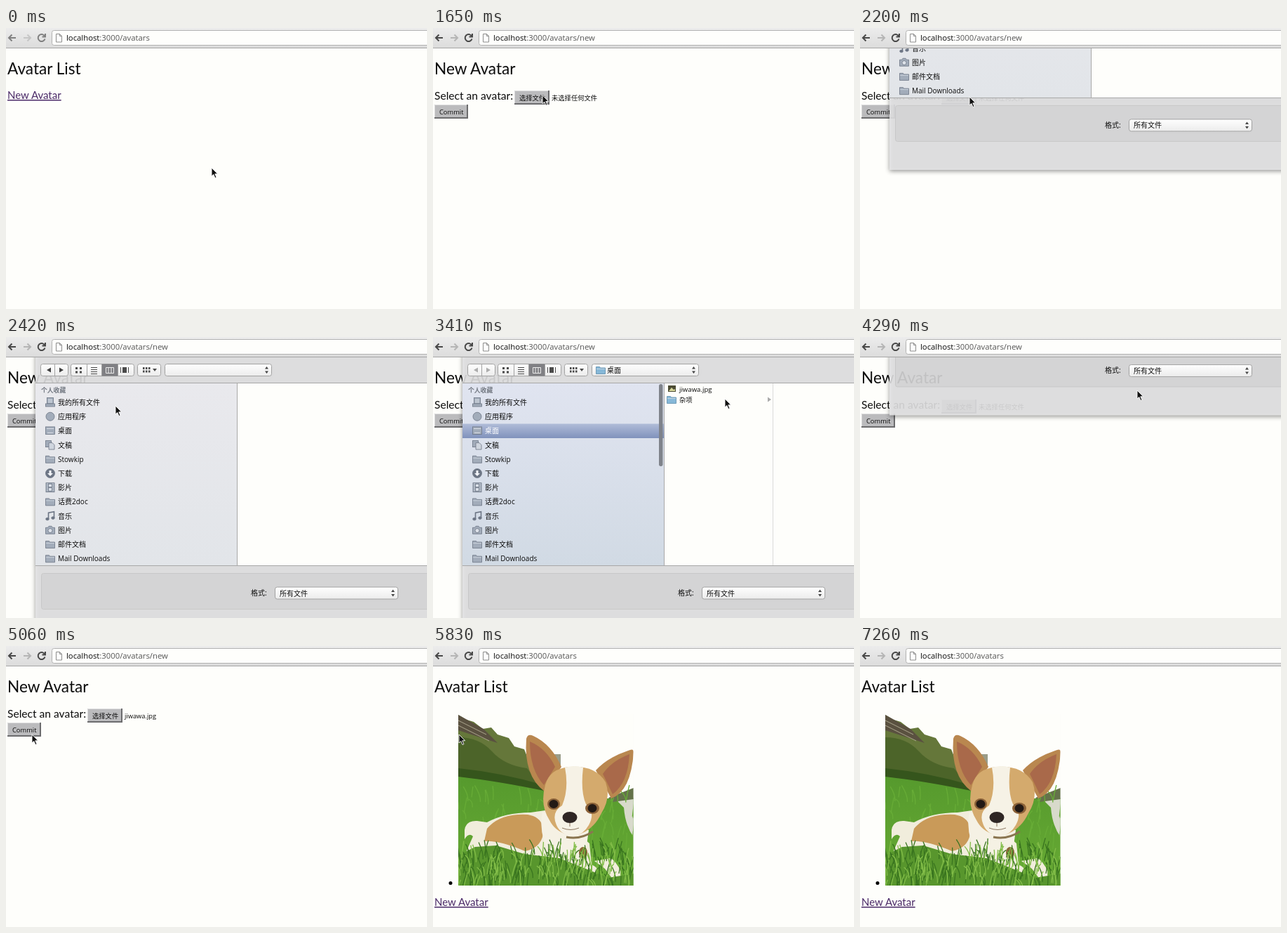
An HTML page that plays this animation: 600 px wide and 400 px high, repeating every 7370 ms.

```html
<!DOCTYPE html>
<html lang="zh">
<head>
<meta charset="utf-8">
<title>Avatar upload</title>
<style>
html, body { margin: 0; width: 100%; height: 100%; overflow: hidden; background: #fefefb; }
svg { display: block; width: 600px; height: 400px; }
text { font: 500 10px "Open Sans", "Noto Sans CJK SC", "Noto Sans CJK", sans-serif; fill: #0c0c0c; }
.page text { font: 15.6px Lato, sans-serif; }
.page .title { font-size: 22.6px; }
.page .link { font-size: 15px; fill: #4b2a68; text-decoration: underline; }
.page .ui { font: 500 9.3px "Open Sans", "Noto Sans CJK SC", "Noto Sans CJK", sans-serif; }
.url { font-size: 11.3px; }
.sheet { filter: drop-shadow(0 2px 3px #0007); }
.icon { fill: #a2acba; stroke: #6c7584; stroke-width: .8; }
.blue .icon { fill: #86b8d8; stroke: #5c8cab; }
.btn { fill: url(#button); stroke: #a2a2a2; }
</style>
</head>
<body>
<svg id="stage" viewBox="0 0 600 400"></svg>
<script>
const LOOP = 7370, STEP = 110;
const NEW_PAGE = 1100, FILLED = 2530, PICKED = 3740, CHOSEN = 4400, DONE = 5280;

const text = (x, y, s, attrs = '') => `<text x="${x}" y="${y}" ${attrs}>${s}</text>`;
const rect = (x, y, w, h, attrs = '') => `<rect x="${x}" y="${y}" width="${w}" height="${h}" ${attrs}/>`;
const path = (d, attrs = '') => `<path d="${d}" ${attrs}/>`;
const oval = (x, y, rx, ry, fill) => `<ellipse cx="${x}" cy="${y}" rx="${rx}" ry="${ry}" fill="${fill}"/>`;
const fade = (id, top, bottom) => `<linearGradient id="${id}" x2="0" y2="1">
  <stop stop-color="${top}"/><stop offset="1" stop-color="${bottom}"/></linearGradient>`;

// Icons in a 14 by 14 box
const glyphs = {
  folder: path('M.5 2.5h5l1 1.5h7v8.5h-13z') + path('M1 5.5h12', 'stroke="#d5dce4"'),
  drive: rect(2.5, .5, 9, 8.5) + rect(.5, 9, 13, 4) + path('M4 3h6M4 5h6M4 7h6', 'stroke="#e8ecf2"'),
  apps: '<circle cx="7" cy="7" r="6"/>',
  desk: rect(.5, 1.5, 13, 10.5) + path('M2 4h10M3 10h8', 'stroke="#eceff4"'),
  docs: rect(.5, 1, 8, 9) + path('M5 4h5l3 3v6.5h-8z', 'fill="#cfd5de"'),
  down: '<circle cx="7" cy="7" r="6.5" fill="#6c7584"/>' +
    path('M5.5 3h3v4h2.5l-4 4-4-4h2.5z', 'fill="#f4f6fa" stroke="none"'),
  film: rect(1, .5, 12, 13) + path('M3 1v12M11 1v12', 'stroke="#eceff4" stroke-dasharray="1.5"') +
    rect(4.5, 2, 5, 4.5, 'fill="#dde2ea"') + rect(4.5, 7.5, 5, 4.5, 'fill="#dde2ea"'),
  music: path('M4.5 11V2.5l8-1.5v8.5', 'fill="none" stroke-width="1.6"') +
    oval(3, 11.5, 2.3, 1.8, '#6c7584') + oval(11, 10, 2.3, 1.8, '#6c7584'),
  photo: path('M.5 3.5h3l1.5-2h4l1.5 2h3v9h-13z') + '<circle cx="7" cy="7.8" r="3" fill="#dde2ea"/>'
};
const icon = (name, x, y) => `<g class="icon" transform="translate(${x} ${y})">${glyphs[name]}</g>`;
const pill = (x, y, w, h = 17) => rect(x + .5, y + .5, w, h, 'rx="3" class="btn"');
const steppers = (x, y) => path(`M${x} ${y - 1.5}l2.5-3.5 2.5 3.5zm0 3l2.5 3.5 2.5-3.5z`, 'fill="#444"');

function bevel(x, y, w, label) {
  return rect(x, y, w, 20, 'fill="#bbbbbd"') +
    path(`M${x + .5} ${y + 19}V${y + .5}h${w - 1}`, 'stroke="#dededf" fill="none"') +
    path(`M${x} ${y + 19}h${w - 1}V${y}`, 'stroke="#6c6c6e" stroke-width="2" fill="none"') +
    text(x + 7, y + 13.5, label, 'class="ui"');
}

function chrome() {
  return rect(0, 0, 600, 28, 'fill="url(#bar)"') + rect(0, 28, 600, 1, 'fill="#a6a6a6"') +
    `<g id="nav" fill="none" stroke-width="2">
      ${path('M14 14H4M8.500 9.500L4 14l4.500 4.500')}
      ${path('M25 14h10M30.500 9.500L35 14l-4.500 4.500', 'opacity=".3"')}
      ${path('M55 11.500a5 5 0 1 0 .500 4M56 8v4.500h-4.500')}</g>` +
    rect(65.5, 3.5, 560, 21, 'rx="3" fill="#fefefc" stroke="#b2b2b2"') +
    path('M71.500 8.500h5l3 3v8.500h-8zM76.500 8.500v3h3', 'fill="#fff" stroke="#8c8c8c"') +
    `<text x="86" y="18" class="url">localhost<tspan fill="#555">:3000/avatars<tspan id="tail"></tspan></tspan></text>`;
}

function seeded(seed) {
  return () => (seed = seed * 16807 % 2147483647) / 2147483647;
}

function blades(count, color, top, seed) {
  const rnd = seeded(seed);
  let d = '';
  for (let i = 0; i < count; i++) {
    const x = 36 + rnd() * 250, y = top + rnd() * (350 - top), lean = rnd() * 16 - 8;
    d += `M${x.toFixed(1)} ${y.toFixed(1)}q1-9 ${lean.toFixed(1)}-${(12 + rnd() * 14).toFixed(1)}`;
  }
  return path(d, `fill="none" stroke="${color}" stroke-width="1.3"`);
}

function photo() {
  const ear = 'fill="#b9874f"', inner = 'fill="#a9694a"', white = 'fill="#f1eddc"';
  return `<g clip-path="url(#frame)">` +
    rect(36, 97, 250, 245, 'fill="#fefefa"') +
    path('M36 98l12 7 10 3 13 10 12-2 9 10 16 5 8 12 14 4 8 20 10 18 20 20H36z', 'fill="#65773a"') +
    path('M36 98l36 20 20 20-56-18z', 'fill="#5a5140"') +
    path('M36 106l40 20M36 113l44 22', 'stroke="#aaa58c"') +
    path('M36 130q30 0 48 20t50 24l20 26H36z', 'fill="#4c6429"') +
    path('M168 154h14v18h-14z', 'fill="#9a9c88"') +
    path('M36 178q60 4 120 20l50 20 80-2v130H36z', 'fill="url(#grass)"') +
    path('M36 174q60 6 122 24v8Q90 192 36 186z', 'fill="#35551c"') +
    path('M256 214l30-12v70q-12-16-14-42z', 'fill="#d8dacb"') +
    path('M250 216l36-14v16l-30 4z', 'fill="#64724a"') +
    blades(130, '#67ac36', 215, 7) +
    path('M45 262q2-14 18-13l14 2q26-14 62-14l28-4 56 48 4 40q-40 14-90 4l-76-24q-20 8-12-12l8-18q-6-6-12 4z', white) +
    path('M77 260q18-22 58-20 24 4 22 28-4 20-26 24-38-16-58-14z', 'fill="#c99a59"') +
    path('M156 236q-6 30 10 60l50 10 6-44z', 'fill="#f5f1e4"') +
    path('M205 308q20-2 30 10l-6 10-26-10zM230 306l24-4q14 12 15 28l-12 3-12-16z', white) +
    path('M133 132q2-8 10-4 26 12 40 44l-24 35q-30-22-26-75z', ear) +
    path('M138 136q24 10 36 36l-16 26q-20-22-20-62z', inner) +
    path('M286 151q0-6-8-2-30 10-46 28l22 40q28-10 32-66z', ear) +
    path('M280 154q-26 10-38 28l14 29q22-16 24-57z', inner) +
    path('M160 198q6-24 36-26 36-2 50 22 8 22-6 44-12 26-38 32-26-2-36-22-14-22-6-50z', 'fill="#d4aa6d"') +
    path('M188 173q14-4 26 0-4 34 4 52 14 12 4 30-8 14-22 16-18-2-24-16-8-18 8-28 10-24 4-54z', 'fill="#f6f2e6"') +
    oval(172, 225, 9, 8, '#8a6138') + oval(227, 231, 10, 8, '#8a6138') +
    oval(172, 225, 6.5, 6, '#221915') + oval(227, 231, 6.5, 6, '#221915') +
    oval(195, 244, 10.5, 8, '#2f2624') +
    path('M195 252v5M184 259q12 5 24 0', 'stroke="#8c7660" fill="none"') +
    path('M190 272q20 4 38-8', 'stroke="#8a7550" fill="none" stroke-width="3"') +
    oval(214, 294, 6, 8, '#8b6636') + oval(212, 299, 3, 3, '#d2b774') +
    path('M36 298l24-12 30-2 40 12 50 6 30 12 40 16 36-6v20H36z', 'fill="#58962d"') +
    blades(170, '#39741f', 296, 31) + blades(120, '#82bd48', 300, 83) + '</g>';
}

function sheet() {
  const places = [['drive', '我的所有文件'], ['apps', '应用程序'], ['desk', '桌面'], ['docs', '文稿'],
    ['folder', 'Stowkip'], ['down', '下载'], ['film', '影片'], ['folder', '话费2doc'],
    ['music', '音乐'], ['photo', '图片'], ['folder', '邮件文档'], ['folder', 'Mail Downloads']];
  const rows = places.map(([name, label], i) => {
    const y = 93 + i * 20.2;
    return icon(name, 56, y - 7) + text(74, y + 4, label, i === 2 ? 'id="desk"' : '');
  }).join('');
  const dots = (x, y) => [0, 4, 8].map(i => rect(x + i, y, 2.5, 3) + rect(x + i, y + 4.5, 2.5, 3)).join('');

  return rect(42, 0, 640, 428, 'fill="#e7e7e9" fill-opacity=".87"') +
    pill(49, 38, 39) + pill(92, 38, 90) + rect(136, 38.5, 23, 17, 'fill="#808084"') +
    path('M69.500 38.500v17M115.500 38.500v17M136.500 38.500v17M159.500 38.500v17', 'stroke="#a2a2a2"') +
    path('M64 43.500v7l-6-3.500zM76 43.500v7l6-3.500z', 'id="arrows" fill="#404040"') +
    `<g fill="#4a4a4a">${rect(99, 43, 3, 3)}${rect(105, 43, 3, 3)}${rect(99, 48.5, 3, 3)}${rect(105, 48.5, 3, 3)}` +
    path('M121 43.500h9M121 46.500h9M121 49.500h9M121 52.500h9', 'stroke="#4a4a4a"') +
    path('M142.500 43.500h11v8h-11zM146 44v8M150 44v8', 'fill="none" stroke="#ececec"') +
    rect(166, 43, 6, 8) + path('M163.500 43v8M174.500 43v8', 'stroke="#4a4a4a"') +
    pill(187, 38, 33) + dots(195, 43) + path('M209 45h6l-3 4z') + '</g>' +
    pill(226, 38, 152) + steppers(369, 47) +
    `<g id="current" class="blue">${icon('folder', 232, 40)}${text(248, 51, '桌面')}</g>` +
    rect(42, 66, 287, 259, 'id="side"') + rect(329, 66, 300, 259, 'fill="#fefefb"') +
    path('M42 65.500h600M42 325.500h600M329.500 66v259', 'stroke="#a8a8a8"') +
    rect(42, 123.5, 287, 20.5, 'id="mark" fill="url(#select)"') +
    text(50, 79, '个人收藏', 'style="font-size:8.8px;font-weight:600;fill:#717780"') + rows +
    `<g id="files" class="blue">${rect(322, 67, 5.5, 117, 'rx="2.7" fill="#7f838b"')}
      ${path('M484.500 66v259', 'stroke="#dadada"')}
      ${rect(330, 65.5, 154, 16, 'id="picked" fill="#8496c0"')}
      ${rect(335, 69, 11, 9, 'fill="#4c4c34"')}${path('M336 77l4-5 3 3 2-1v3z', 'fill="#d6d69a"')}
      ${text(351, 77.5, 'jiwawa.jpg', 'id="file" style="font-size:9.6px"')}
      ${icon('folder', 333, 82)}${text(351, 92.5, '杂项', 'style="font-size:9.3px"')}
      ${path('M477 85.500v7l5-3.500z', 'fill="#aaa"')}</g>` +
    rect(50.5, 336.5, 640, 51, 'rx="3" fill="#000" fill-opacity=".04" stroke="#c8c8c8"') +
    text(349, 368, '格式:') + pill(383, 355.5, 175) + text(390, 368.5, '所有文件') + steppers(549, 364.5);
}

const stage = document.getElementById('stage');
stage.innerHTML = `<defs>
    ${fade('bar', '#ececec', '#dcdcdc')}${fade('button', '#fefefe', '#ececec')}
    ${fade('plain', '#e9e9ed', '#e2e5e9')}${fade('tinted', '#e0e4f0', '#d1dae4')}
    ${fade('select', '#b0bcd8', '#8092bc')}${fade('grass', '#55992d', '#68ab34')}
    <clipPath id="below">${rect(0, 29, 600, 371)}</clipPath>
    <clipPath id="frame">${rect(36, 97, 249.5, 244)}</clipPath>
  </defs>` + rect(0, 0, 600, 400, 'fill="#fefefb"') +
  `<g class="page">
    ${text(2, 66, '', 'id="title" class="title"')}
    <g id="form">${text(2, 101.5, 'Select an avatar:')}${bevel(116, 89, 50, '选择文件')}
      ${text(169, 102.5, '', 'id="status" class="ui"')}${bevel(2, 109, 48, 'Commit')}</g>
    <g id="shot"><circle cx="25" cy="337.500" r="2.500"/>${photo()}</g>
    ${text(2, 101, 'New Avatar', 'id="link" class="link"')}
  </g>
  <g clip-path="url(#below)"><g id="sheet" class="sheet">${sheet()}</g></g>` + chrome() +
  path('M0 0v12l2.800-2.500 2.200 5 2-.900-2.200-4.800h3.900z',
    'id="cursor" fill="#111" stroke="#fff" stroke-width=".9"');

const el = Object.fromEntries([...stage.querySelectorAll('[id]')].map(e => [e.id, e]));
const show = (e, on) => e.setAttribute('display', on ? 'inline' : 'none');
const ease = (t, from, to) => {
  const p = Math.min(1, Math.max(0, (t - from) / (to - from)));
  return p * p * (3 - 2 * p);
};

// Pointer stops: time, x, y
const stops = [[0, 293, 199], [770, 48, 94], [1100, 48, 94], [1600, 156, 95], [1760, 156, 98],
  [2750, 156, 98], [3410, 416, 88], [3700, 395, 76], [4400, 395, 76], [5060, 37, 126],
  [6820, 37, 126], [7200, 560, -20], [LOOP, 560, -20]];

function pointer(t) {
  const i = stops.findIndex(s => s[0] > t);
  const [t0, x0, y0] = stops[i - 1], [t1, x1, y1] = stops[i];
  const p = ease(t, t0, t1);
  return [x0 + (x1 - x0) * p, y0 + (y1 - y0) * p];
}

function draw(t) {
  const isNew = t >= NEW_PAGE && t < DONE, done = t >= DONE;
  el.title.textContent = isNew ? 'New Avatar' : 'Avatar List';
  el.tail.textContent = isNew ? '/new' : '';
  el.status.textContent = t < CHOSEN ? '未选择任何文件' : 'jiwawa.jpg';
  el.nav.setAttribute('stroke', t < NEW_PAGE ? '#808080' : '#484848');
  show(el.form, isNew);
  show(el.shot, done);
  show(el.link, !isNew);
  el.link.setAttribute('y', done ? 370 : 101);

  const open = ease(t, 2100, 2320) - ease(t, 4134, 4354);
  show(el.sheet, open > 0);
  el.sheet.setAttribute('transform', `translate(0 ${398 * (open - 1)})`);

  const filled = t >= FILLED, picked = t >= PICKED;
  [el.current, el.mark, el.files].forEach(e => show(e, filled));
  show(el.picked, picked);
  el.file.style.fill = picked ? '#fff' : '';
  el.desk.style.fill = filled ? '#fff' : '';
  el.arrows.setAttribute('opacity', filled ? .4 : 1);
  el.side.setAttribute('fill', `url(#${filled ? 'tinted' : 'plain'})`);
  el.cursor.setAttribute('transform', `translate(${pointer(t)})`);
}

const start = performance.now();
function tick() {
  const t = (performance.now() - start) % LOOP;
  draw(Math.floor(t / STEP) * STEP);
  requestAnimationFrame(tick);
}
tick();
</script>
</body>
</html>
```
